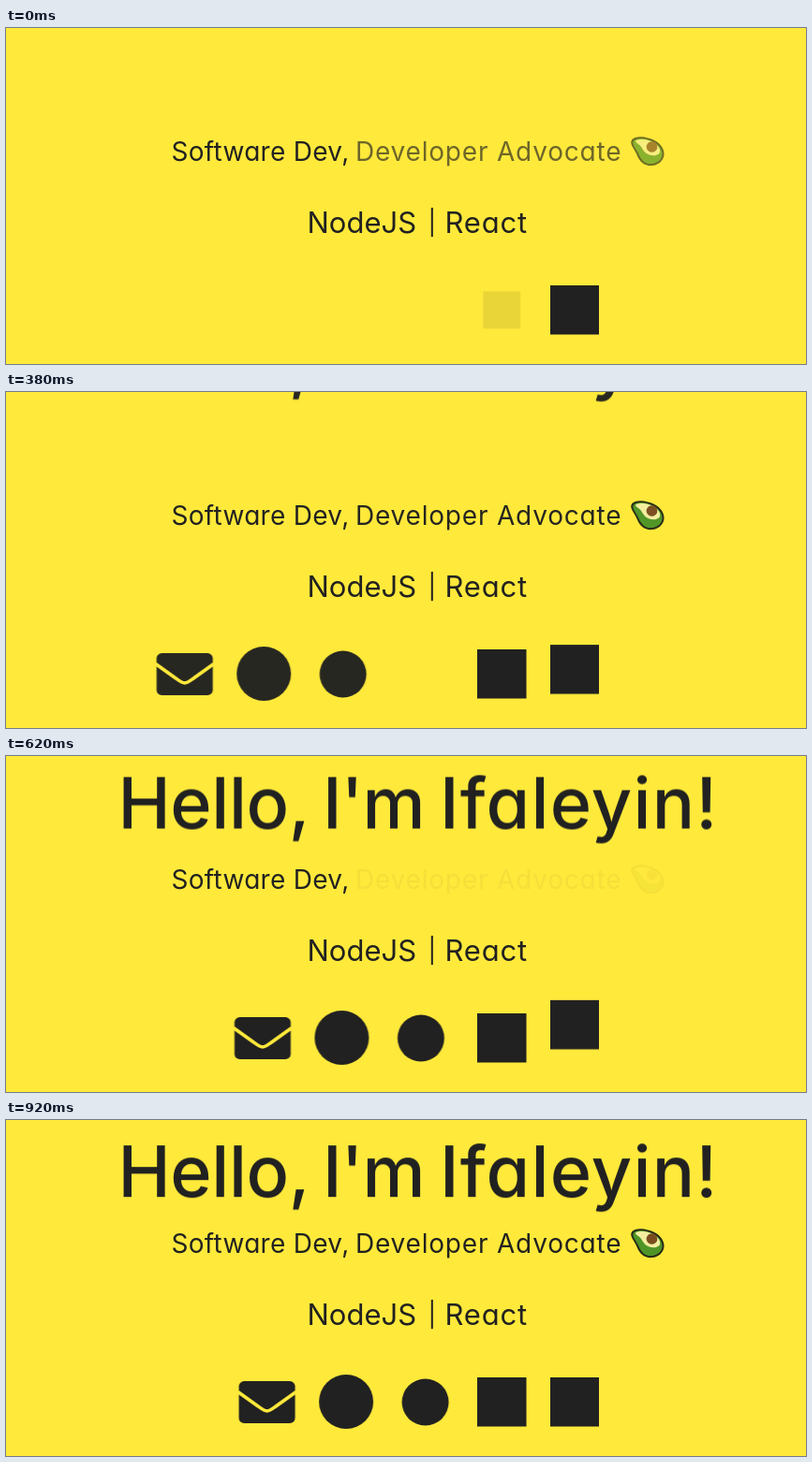
These frames come from a looping animation (854x359 px, 1070 ms). An HTML page:

```html
<!DOCTYPE html>
<html lang="en">
<head>
<meta charset="utf-8">
<title>Hello</title>
<style>
  html, body { margin: 0; width: 100%; height: 100%; overflow: hidden; background: #ffe93b; }
  svg { display: block; width: 100vw; height: 100vh; fill: #212121; }
  text { font-family: Inter, "Open Sans", sans-serif; font-feature-settings: "cv11"; white-space: pre; }
  .title { font-size: 75.5px; font-weight: 500; }
  .role { font-size: 28px; letter-spacing: .3px; }
  .stack { font-size: 31px; }
  .bar { font-size: 26px; }
  .wide { letter-spacing: .8px; }
  #zoom { transform-box: fill-box; transform-origin: center; }
</style>
</head>
<body>
<svg viewBox="0 0 854 359">
  <g id="title" class="title">
    <text x="119.5" y="82" letter-spacing="-.4">Hello,</text>
    <text x="338" y="82" letter-spacing="-.8">I'm</text>
    <text x="463" y="82" letter-spacing="1.2">Ifaleyin!</text>
  </g>

  <text class="role" x="176.5" y="141.5">Software Dev,</text>
  <g id="flash">
    <text class="role wide" x="373" y="141.5">Developer Advocate</text>
    <g transform="rotate(-8 686 131)">
      <path fill="#262a17" d="M670 117C673 114 681 114.500 687 117.500C695 120.500 702 127 702 135C702 142 696 147.500 688 147.500C680 147.500 675 142 673 134C671.500 127 666 121 670 117Z"/>
      <path fill="#4f9428" d="M671.500 118.500C674 116 681 116.500 686 119C693 122 700 128 700 135C700 141 695 145.500 688 145.500C681 145.500 677 141 675 133.500C673.500 127 668.500 121.500 671.500 118.500Z"/>
      <path fill="#f2eea0" d="M674 118.500C677 117 683 118 687 120C694 123 699 128.500 698 133.500C697 138 690 138 685 135C680 132 680 127 677 123.500C675 121.500 672.500 119.500 674 118.500Z"/>
      <circle cx="690" cy="127.500" r="5.800" fill="#7a4d22"/>
    </g>
  </g>

  <g class="stack">
    <text x="321.500" y="218.500">NodeJS</text>
    <text class="bar" x="450.500" y="217">|</text>
    <text class="wide" x="468.500" y="218.500">React</text>
  </g>

  <g id="icons">
    <rect x="248.500" y="279" width="60" height="45" rx="5.600"/>
    <path d="M247.500 290.500L268.800 305.700C272 308 275.500 310.900 278.500 310.900S285 308 288.200 305.700L309.500 290.500" fill="none" stroke="#ffe93b" stroke-width="3.700"/>
    <circle cx="363" cy="301" r="29"/>
    <circle cx="447.500" cy="301.500" r="25"/>
  </g>
  <rect id="zoom" x="503" y="275" width="52.500" height="52.500"/>
  <rect id="bounce" x="581" y="275" width="52" height="52.500"/>
</svg>
<script>
  const LOOP = 1070, FPS = 13;

  const easeIn = x => x ** 2;
  const easeOut = x => 1 - (1 - x) ** 2.63;
  const soft = x => 1 - (1 - x) ** 3 * (1 + 3 * x);

  // Value at time t along key points [time, value, ease towards this point].
  function along(t, keys) {
    const i = keys.findIndex(([time]) => time > t);
    if (i < 0) return keys[keys.length - 1][1];
    if (i === 0) return keys[0][1];
    const [t0, v0] = keys[i - 1], [t1, v1, ease] = keys[i];
    return v0 + (v1 - v0) * ease((t - t0) / (t1 - t0));
  }

  // The entrance overshoots, then settles; it began just before the loop.
  const slide = t => along(t + 55, [
    [0, -3600], [600, 25, easeOut], [750, -11.5, easeOut], [900, 5, easeOut], [1000, 0, easeOut]
  ]);
  const slideFade = t => easeOut(Math.min(1, (t + 55) / 600));

  const hop = t => along(t, [
    [40, 0], [290, -30, easeIn], [310, -30, easeOut], [460, 0, easeOut],
    [620, -15, easeIn], [700, 0, easeOut], [780, -4, easeIn], [880, 0, easeOut]
  ]);

  function blink(t) {
    const phase = (t + 74) % 500 / 250;
    return phase < 1 ? 1 - soft(phase) : soft(phase - 1);
  }

  const grow = t => Math.max(0, 1 - t / 310) ** 2;

  const move = (x, y) => `translate(${x}px, ${y}px)`;

  // Poses are held for one picture each, on a 10 ms clock.
  function play(id, pose) {
    const frames = [];
    for (let k = 0; k < FPS; k++) {
      const t = k * 1000 / FPS;
      frames.push({ offset: Math.round(t / 10) * 10 / LOOP, easing: "step-end", ...pose(t) });
    }
    frames.push({ ...frames[FPS - 1], offset: 1 });
    document.getElementById(id).animate(frames, { duration: LOOP, iterations: Infinity });
  }

  play("flash", t => ({ opacity: blink(t) }));
  play("zoom", t => ({ transform: `scale(${1 - .24 * grow(t)})`, opacity: 1 - .9 * grow(t) }));
  play("bounce", t => ({ transform: move(0, hop(t)) }));
  play("title", t => ({ transform: move(0, slide(t)), opacity: slideFade(t) }));
  play("icons", t => ({ transform: move(slide(t), 0), opacity: slideFade(t) }));
</script>
</body>
</html>
```
